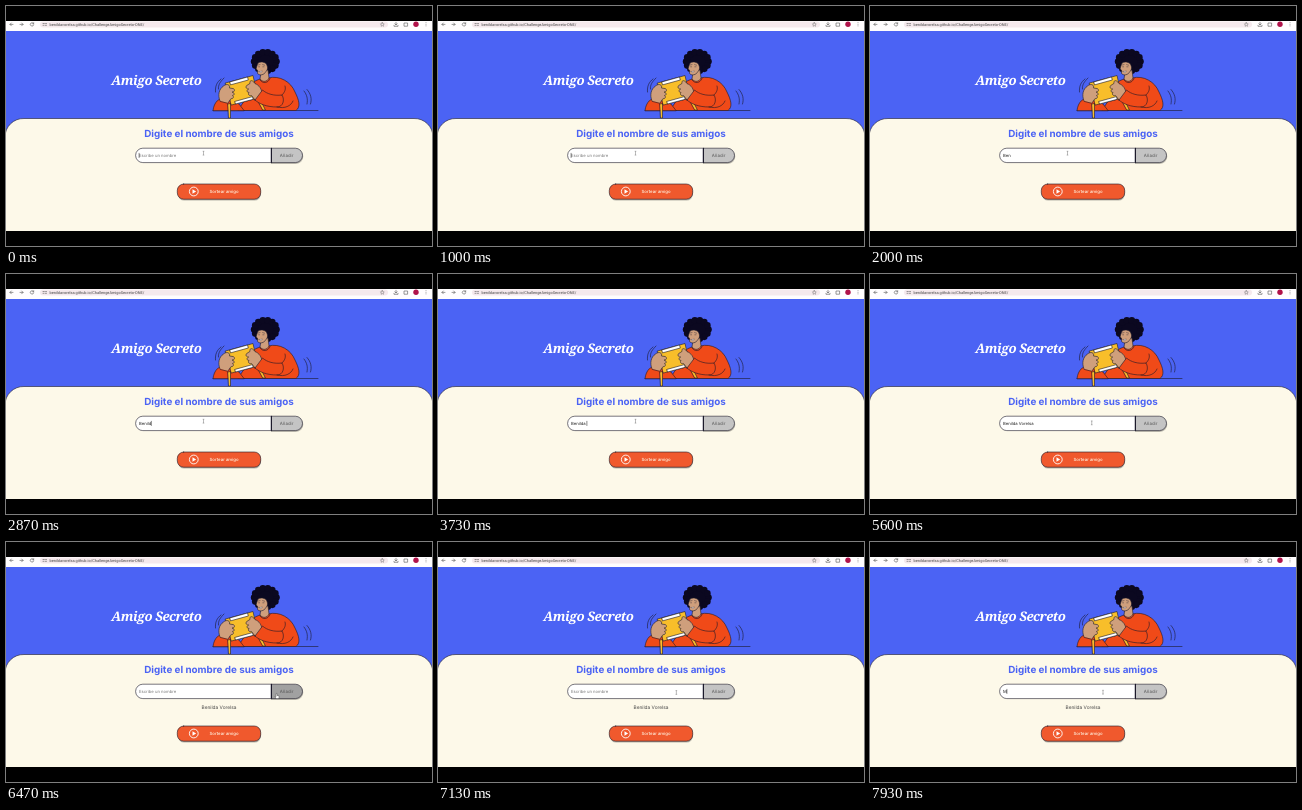
Animation of 426 by 240 pixels, one loop 8000 ms. Source, as an HTML page:

```html
<!DOCTYPE html>
<html lang="es">
<head>
<meta charset="utf-8">
<title>Amigo Secreto</title>
<style>
  html, body { margin: 0; width: 100%; height: 100%; overflow: hidden; background: #000; }
  svg { display: block; width: 100%; height: 100%; }
  text { font-family: Inter, sans-serif; font-size: 4.2px; white-space: pre; text-rendering: geometricPrecision; }
  .ink { stroke: #1c1a2b; stroke-width: .6; stroke-linejoin: round; stroke-linecap: round; }
  .line { fill: none; }
  .icon { fill: none; stroke: #555; stroke-width: .6; stroke-linecap: round; stroke-linejoin: round; }
  .orange { fill: #f04a18; }
  .skin { fill: #cf9f7c; }
  .yellow { fill: #f8be2a; }
</style>
</head>
<body>
<svg viewBox="0 0 426 240">
  <rect width="426" height="240"/>

  <!-- browser bar -->
  <rect y="15" width="426" height="10" fill="#fffdfe"/>
  <rect x="34" y="15.5" width="348" height="6" rx="3" fill="#f5e9ed"/>
  <g class="icon">
    <path d="M7 18.4H4M5.3 17L4 18.4L5.3 19.8M14 18.4H17M15.7 17L17 18.4L15.7 19.8"/>
    <path d="M27.4 17.4A1.7 1.7 0 1 0 27.7 18.8M27.7 16.6V17.7H26.6"/>
    <path d="M37 17.5H38.3M39.6 17.5H40.5M37 19.3H38M39.3 19.3H40.5"/>
    <path d="M376.3 16.4L376.9 17.7L378.3 17.9L377.3 18.9L377.5 20.3L376.3 19.6L375.1 20.3L375.3 18.9L374.3 17.9L375.7 17.7Z" stroke-width=".4"/>
    <path d="M390 16.3V18.8M388.8 17.8L390 19L391.2 17.8M388 19.3V20.3H392V19.3"/>
    <path d="M398.4 17H401.6V20.2H398.4Z"/>
  </g>
  <circle cx="410" cy="18.2" r="2.7" fill="#b0124a"/>
  <path d="M420 16.7V16.71M420 18.3V18.31M420 19.9V19.91" class="icon" stroke-width=".8"/>
  <text x="43.5" y="19.8" fill="#444" style="font-family:Roboto,sans-serif;font-size:3.9px">benildavorelsa.github.io/ChallengeAmigoSecreto-ONE/</text>

  <!-- page -->
  <rect y="25" width="426" height="200" fill="#4b63f4"/>
  <text x="105.3" y="79" fill="#fff" style="font:italic 700 13.2px 'Noto Serif',serif;letter-spacing:-.034em">Amigo Secreto</text>

  <!-- illustration -->
  <g class="ink">
    <path class="line" d="M207 104.5H312"/>
    <path class="orange" d="M244 79C249 74 255 72 262 72C274 69 285 76 289 86C293 94 295 101 290 104.5H232L240 92Z"/>
    <g fill="#0b0820" stroke="none" id="hair"></g>
    <path class="skin" d="M255 66L254 73C257 76.5 261 76 263 72L262 64Z"/>
    <path class="skin" d="M252 57C250.6 60 250.8 61 250 63L251.4 64L251.6 67.6C254 70 258 69 260 65.5C262.4 63 261.6 60 260 57.5C257.5 55.5 254 55.5 252 57Z"/>
    <path class="line" stroke-width=".4" d="M252 59L254 58.6M256.6 58.6L258.6 59.2M252.6 60.8H253.6M256.8 60.8H258"/>
    <path d="M253 65.4C254.3 65.7 255.3 65.4 256.2 64.8C256 66.8 253.8 67.2 253 65.4Z" fill="#fff" stroke-width=".3"/>
    <path class="orange" d="M207 104.5C208 96 213 91 220 93L233 98L238 104.5Z"/>
    <path class="yellow" d="M222 98L224.5 97.5L224.5 112H222.8ZM250 91L252.4 90L259.4 104H257Z"/>
    <path class="yellow" d="M219.5 77L247 69.5L252 92L225.5 99Z"/>
    <path fill="#fff" d="M224 75.9L241.5 71L242.3 74L224.8 78.8ZM229 95.4L246.5 90.6L247.2 93.3L229.8 97.9Z"/>
    <path class="skin" d="M214 95C211.5 89 213 83 217.5 80C221 77 224.5 79 223.5 82L227.5 82.6C229.6 84.4 228 86.2 226 86C229.2 87 228.5 89.4 226.5 89.4C228.4 91 227 93 225 92.6L222 97Z"/>
    <path class="skin" d="M256 88C256 83 253 79 249 77.6C246.6 73.6 243.4 73.8 244 77.4L240.6 79.6C239.2 81.6 240.6 83 242.6 83C240 84.5 241 86.4 243 86.4C241.6 88.4 243 90 245.6 89.6L249 94Z"/>
    <path class="orange" d="M249 94L256.5 84C261 88 268 90 276 89C279 94 277 101 271 101C261 101 253 98 249 94Z"/>
    <path class="line" d="M276 89C279 86 280 83 279 80M271 101C279 103 285 100 287 95M254 74C257 78 262 77.5 264 72.5"/>
    <path class="line" d="M215 73C211 76 209 80 209.5 86M218 72C214 76 212 79 212.5 83M298 85C301 89 302 93 301 98M301 83.5C305 88 306 93 304.5 98"/>
  </g>

  <path class="ink" d="M-1 226V131A18.5 18.5 0 0 1 18 112.5H408A18.5 18.5 0 0 1 427 131V226Z" fill="#fdf9e9"/>
  <path d="M0 225H426V240H0Z"/>
  <text x="213" y="131.4" fill="#4b63f4" text-anchor="middle" style="font-size:9.85px;font-weight:700">Digite el nombre de sus amigos</text>

  <!-- form -->
  <path d="M265 143.3H290A7.2 7.2 0 0 1 290 157.9H265Z" fill="#000" opacity=".25"/>
  <path class="ink" d="M265.5 142.2H136.8A7.2 7.2 0 0 0 136.8 156.6H265.5Z" fill="#fff"/>
  <path class="ink" id="add" d="M265.5 142.2H289.3A7.2 7.2 0 0 1 289.3 156.6H265.5Z"/>
  <path d="M265.5 142V156.8" stroke="#1c1a2b"/>
  <text x="280.6" y="150.8" fill="#555" text-anchor="middle" style="font-size:4.4px">Añadir</text>
  <text id="field" x="133" y="150.8"></text>
  <path id="caret" stroke="#111" stroke-width=".5" d="M0 146.9V151.9"/>
  <text id="item" x="213" y="167.2" fill="#444" text-anchor="middle" style="font-size:4.8px"></text>

  <!-- draw button, pushed down by the list -->
  <g id="draw">
    <rect x="171.8" y="179.3" width="83.2" height="15.2" rx="6.4" fill="#000" opacity=".28"/>
    <rect class="ink" x="171.3" y="178" width="83.4" height="15.2" rx="6.4" fill="#f0592d"/>
    <circle cx="187.8" cy="185.5" r="4.4" fill="none" stroke="#fff" stroke-width=".9"/>
    <path d="M186.5 183.3L190.1 185.5L186.5 187.7Z" fill="#fff"/>
    <text x="203.6" y="187" fill="#fff9e8" style="font-size:4.3px;font-weight:500">Sortear amigo</text>
  </g>

  <!-- pointers, hot spot at 0,0 -->
  <path id="beam" fill="none" stroke="#666" stroke-width=".45" d="M-.8 -1.9H.8M0 -1.9V1.9M-.8 1.9H.8"/>
  <path id="hand" fill="#fff" stroke="#333" stroke-width=".35" stroke-linejoin="round" d="M-.4 -.3C-.4 -1 .5 -1 .5 -.3V1.2L2.5 1.7V3.2L2 4.4H-.3L-1.6 2.3L-.4 2.4Z"/>
</svg>
<script>
const LOOP = 8000;
const NAME = 'Benilda Vorelsa';
const KEYS = [1120, 1260, 1400, 2250, 2480, 2700, 2950, 3400,
              3860, 4030, 4200, 4350, 4510, 4720, 4930];
const CLICK = 6390, FOCUS = 7330, SECOND = 7800;
const LIST_SHIFT = 6;
// pointer stops: time, x, y
const STOPS = [[0, 197.5, 147.2], [5350, 197.5, 147.2], [6000, 270.5, 152.2],
               [6750, 270.5, 152.2], [7250, 233, 150.2], [LOOP, 233, 150.2]];

const $ = id => document.getElementById(id);
const show = (el, on) => el.setAttribute('visibility', on ? 'visible' : 'hidden');
const move = (el, x, y) => el.setAttribute('transform', `translate(${x} ${y})`);
const ease = p => p * p * (3 - 2 * p);

// curly hair: a ring of discs around a solid core
let curls = '<ellipse cx="259.3" cy="55.5" rx="12" ry="10.5"/>';
for (let i = 0; i < 14; i++) {
  const a = i * Math.PI / 7;
  curls += `<circle cx="${259.3 + 11.2 * Math.cos(a)}" cy="${55.5 + 9.4 * Math.sin(a)}" r="3.3"/>`;
}
$('hair').innerHTML = curls;

function pointer(t) {
  const i = STOPS.findIndex(s => s[0] > t);
  const [t0, x0, y0] = STOPS[i - 1], [t1, x1, y1] = STOPS[i];
  const p = ease((t - t0) / (t1 - t0));
  return [x0 + (x1 - x0) * p, y0 + (y1 - y0) * p];
}

function inputState(t) {
  if (t < CLICK) {
    const count = KEYS.filter(k => k <= t).length;
    return { text: NAME.slice(0, count), last: count ? KEYS[count - 1] : -60, focus: true };
  }
  const typed = t >= SECOND;
  return { text: typed ? 'M' : '', last: typed ? SECOND : FOCUS, focus: t >= FOCUS };
}

function render(t) {
  const { text, last, focus } = inputState(t);
  const field = $('field');
  field.textContent = text || 'Escribe un nombre';
  field.setAttribute('fill', text ? '#1c1c1c' : '#777');

  const end = 133.1 + (text ? field.getComputedTextLength() : 0);
  move($('caret'), end, 0);
  show($('caret'), focus && (t - last) % 1060 < 530);

  const added = t >= CLICK;
  $('item').textContent = added ? NAME : '';
  move($('draw'), 0, added ? LIST_SHIFT : 0);

  const [x, y] = pointer(t), over = x > 265;
  $('add').setAttribute('fill', over ? '#a1a1a1' : '#c4c4c4');
  for (const id of ['beam', 'hand']) {
    move($(id), x, y);
    show($(id), over === (id === 'hand'));
  }
}

const start = performance.now();
function tick() {
  render((performance.now() - start) % LOOP);
  requestAnimationFrame(tick);
}
tick();
</script>
</body>
</html>
```
